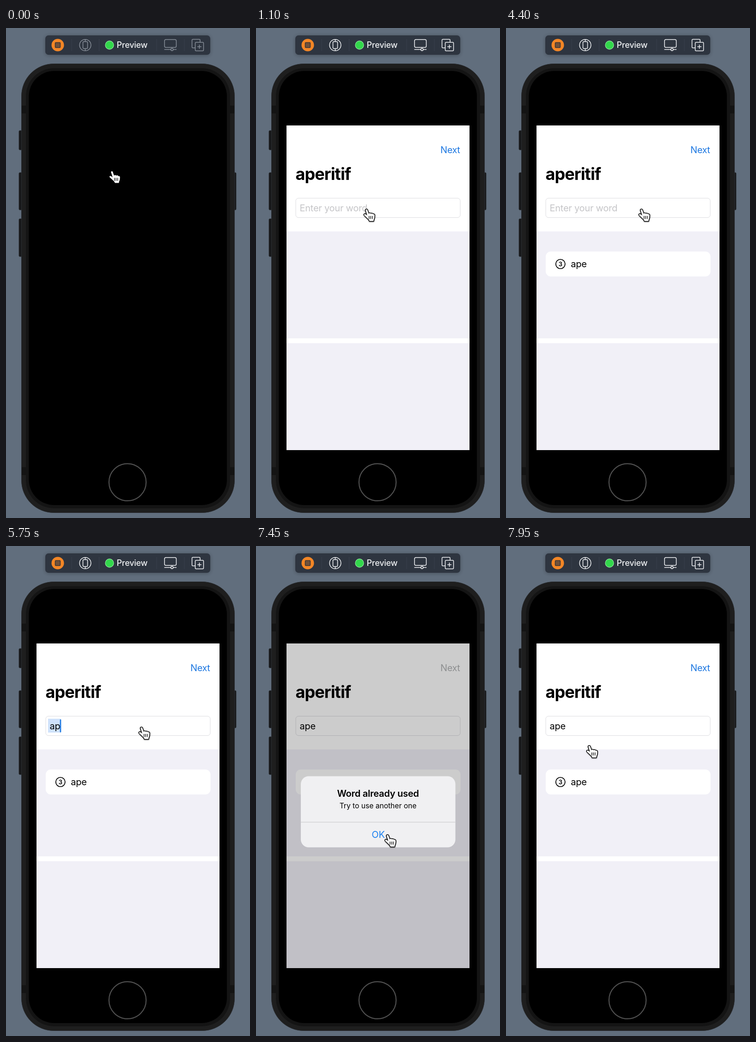
Animation of 528x1061 px, one loop 8000 ms. Source, as an HTML page:

```html
<!DOCTYPE html>
<html lang="en">
<head>
<meta charset="utf-8">
<title>Word game preview</title>
<style>
  html, body { margin: 0; width: 100%; height: 100%; overflow: hidden; background: #616e7d; }
  svg { display: block; width: 100vw; height: 100vh; }
  text { font-family: Inter, "Open Sans", sans-serif; font-size: 20px; letter-spacing: -.25px; white-space: pre; }
  .mid { text-anchor: middle; }
</style>
</head>
<body>
<svg viewBox="0 0 528 1061" preserveAspectRatio="none">
  <defs>
    <filter id="soft" x="-10%" y="-40%" width="120%" height="190%">
      <feDropShadow dx="0" dy="1" stdDeviation="4" flood-opacity=".28"/>
    </filter>
    <filter id="handShade" x="-30%" y="-30%" width="160%" height="170%">
      <feDropShadow dx="0" dy="1" stdDeviation="1" flood-opacity=".35"/>
    </filter>
  </defs>
  <rect width="528" height="1061" fill="#616e7d"/>

  <!-- toolbar -->
  <rect x="85" y="16" width="357" height="42" rx="7" fill="#2d3440" filter="url(#soft)"/>
  <path d="M142 24V50M201.500 24V50M326 24V50M386 24V50" stroke="#39414d"/>
  <circle cx="112" cy="37" r="13.500" fill="#f28626"/>
  <rect x="106.500" y="31.500" width="11" height="11" rx="1.500" fill="#70513a" stroke="#3a3535" stroke-width="1.500"/>
  <circle cx="224" cy="37" r="9" fill="#32d74b" stroke="#8ae698" stroke-width="1.300"/>
  <text x="239.500" y="43.300" font-weight="500" fill="#eef0f2" style="font-size:18px">Preview</text>
  <g id="icons" fill="none" stroke-width="1.500">
    <circle cx="171.500" cy="37" r="12.300"/>
    <rect x="166.500" y="29.500" width="10" height="15" rx="2"/>
    <path d="M171.500 25V29M171.500 45V49"/>
    <rect x="343" y="25" width="25.500" height="17" rx="3"/>
    <path d="M342.500 46.500H356M362.500 46.500H369"/>
    <circle cx="359.300" cy="46.500" r="2.600"/>
    <path d="M409 43H404.500a2 2 0 0 1-2-2V26.500a2 2 0 0 1 2-2H418a2 2 0 0 1 2 2V31"/>
    <rect x="409.500" y="31" width="18" height="18.500" rx="2"/>
    <path d="M418.500 36V45M414 40.500H423"/>
  </g>

  <!-- phone -->
  <g fill="#17181a" stroke="#2b2f34" stroke-width=".8">
    <rect x="28" y="222" width="8" height="42" rx="2"/>
    <rect x="28" y="313" width="8" height="81" rx="2"/>
    <rect x="28" y="413" width="8" height="82" rx="2"/>
    <rect x="491" y="313" width="7" height="81" rx="2"/>
  </g>
  <rect x="33.500" y="77.500" width="461" height="972" rx="70" fill="#1e1e1e" stroke="#2a2d31"/>
  <path d="M34 168h9v17h-9zM485 168h9v17h-9zM34 951h9v17h-9zM485 951h9v17h-9z" fill="#141414"/>
  <rect x="43" y="87" width="442" height="953" rx="61" fill="#141414"/>
  <rect x="49.500" y="93" width="428.500" height="940" rx="55"/>
  <circle cx="263" cy="983.500" r="40.200" fill="none" stroke="#505050" stroke-width="2.200"/>

  <!-- app -->
  <g id="app">
    <rect x="66" y="211" width="396" height="703" fill="#fff"/>
    <path d="M66 440.500H462V672H66zM66 682.500H462V914H66z" fill="#f1f0f7"/>
    <text id="next" x="441.500" y="270.700" text-anchor="end" style="letter-spacing:-.4px">Next</text>
    <text x="85.500" y="329" font-weight="700" style="font-size:36px;letter-spacing:-.9px">aperitif</text>
    <rect x="86" y="368.500" width="356" height="42" rx="6" fill="none" stroke="#dcdce0"/>
    <rect id="mark" x="91" y="374" height="30" fill="#cfe2fb"/>
    <text id="word" x="94.500" y="397"></text>
    <rect id="caret" y="375.500" width="2.600" height="28" rx="1" fill="#1f78e0"/>
    <g id="row">
      <rect x="86" y="484" width="356.500" height="54" rx="11" fill="#fff"/>
      <circle cx="117.800" cy="511" r="10" fill="none" stroke="#000" stroke-width="1.700"/>
      <text x="117.800" y="515.600" class="mid" font-weight="600" style="font-size:13px;letter-spacing:0">3</text>
      <text x="140.300" y="518">ape</text>
    </g>
    <rect id="dim" x="66" y="211" width="396" height="703"/>
    <g id="alert">
      <rect x="97" y="498.500" width="334.500" height="154" rx="17" fill="#f0f0f2"/>
      <path d="M97 598H431.500" stroke="#c6c6ca"/>
      <text x="264" y="542.700" class="mid" font-weight="600">Word already used</text>
      <text x="264" y="567.700" class="mid" style="font-size:15.600px;letter-spacing:0">Try to use another one</text>
      <text id="ok" x="264.500" y="632.500" class="mid">OK</text>
    </g>
  </g>

  <g id="hand" filter="url(#handShade)">
    <path d="M-1.800 .6C-1.600-1.600 1.400-1.800 2.100 .2L5 8.200C6 6.400 9 6.600 9.500 8.300C11 7 13.500 7.600 14 9.400C15.500 8.500 17.700 9.500 17.600 11.800L17.400 15.500C17.300 18 15.700 20 15.300 24H6.700C6.200 21 2 18-.5 15.500C-3 13-6 11.500-4.800 9.500C-3.500 8-1 9 1.800 12.300Z"
      fill="#fff" stroke="#000" stroke-width="3" stroke-linejoin="round" paint-order="stroke"/>
    <path d="M5.700 13V19.500M9.200 13V19.500M12.700 13V19.500" stroke="#000" stroke-width="1.300"/>
  </g>
</svg>
<script>
const LOOP = 8000, STEP = 50;
const BLUE = [30, 120, 225], GRAY = [176, 178, 180];
const $ = id => document.getElementById(id);
const clamp = x => Math.min(1, Math.max(0, x));
const span = (t, a, b) => clamp((t - a) / (b - a));
const ease = x => x * x * (3 - 2 * x);
const mix = (a, b, k) => a + (b - a) * k;
const tint = (a, b, k) => `rgb(${a.map((v, i) => Math.round(mix(v, b[i], k)))})`;
const set = (id, attrs) => {
  for (const key in attrs) $(id).setAttribute(key, attrs[key]);
};

// time, typed text, caret shown, text marked
const typing = [
  [0, "", 0, 0], [1700, "", 1, 0], [2350, "", 0, 0], [2700, "", 1, 0],
  [2850, "a", 1, 1], [3050, "ap", 1, 1], [3150, "ap", 1, 0], [3700, "ape", 1, 0],
  [4050, "", 1, 0], [4400, "", 0, 0], [5050, "", 1, 0],
  [5550, "a", 1, 1], [5650, "ap", 1, 1], [6100, "ape", 1, 0], [6550, "ape", 0, 0]
];
const caretX = [94, 105.5, 116.700, 128.500];

// start, end, x, y of the fingertip
const moves = [
  [0, 0, 229, 311.500], [400, 1100, 239, 394], [1900, 2150, 293, 394],
  [6850, 7350, 284.500, 627], [7550, 7950, 180, 434]
];

function tip(t) {
  let [, , x, y] = moves[0];
  for (const [a, b, nx, ny] of moves.slice(1)) {
    const k = ease(span(t, a, b));
    x = mix(x, nx, k);
    y = mix(y, ny, k);
  }
  return [x, y];
}

function draw(t) {
  const [, word, caret, marked] = typing.filter(s => s[0] <= t).pop();
  const empty = word === "";
  $("word").textContent = empty ? "Enter your word" : word;
  set("word", { fill: empty ? "#c5c5c8" : "#000" });
  set("caret", { x: caretX[word.length], opacity: caret });
  set("mark", { width: caretX[word.length] - 89, opacity: marked });

  set("icons", { stroke: t < 950 ? "#878e98" : "#f2f4f6" });
  set("app", { opacity: ease(span(t, 0, 500)) });
  set("row", { opacity: span(t, 4000, 4100) });

  const rise = t < 6550 ? 0 : 1 - Math.exp((6500 - t) / 88);
  const leave = ease(span(t, 7500, 7850));
  const shown = rise * (1 - leave);
  const size = 1 + 0.2 * (1 - rise);
  set("dim", { opacity: 0.2 * shown });
  set("alert", {
    opacity: shown,
    transform: `translate(264 575.5) scale(${size}) translate(-264 -575.5)`
  });
  set("ok", { fill: tint([142, 142, 147], [30, 130, 240], span(t, 6600, 6800)) });
  set("next", { fill: tint(BLUE, GRAY, span(t, 6500, 6600) * (1 - leave)) });
  set("hand", { transform: `translate(${tip(t)})` });
}

function tick(now) {
  draw(Math.floor((now % LOOP) / STEP) * STEP);
  requestAnimationFrame(tick);
}
draw(0);
requestAnimationFrame(tick);
</script>
</body>
</html>
```
